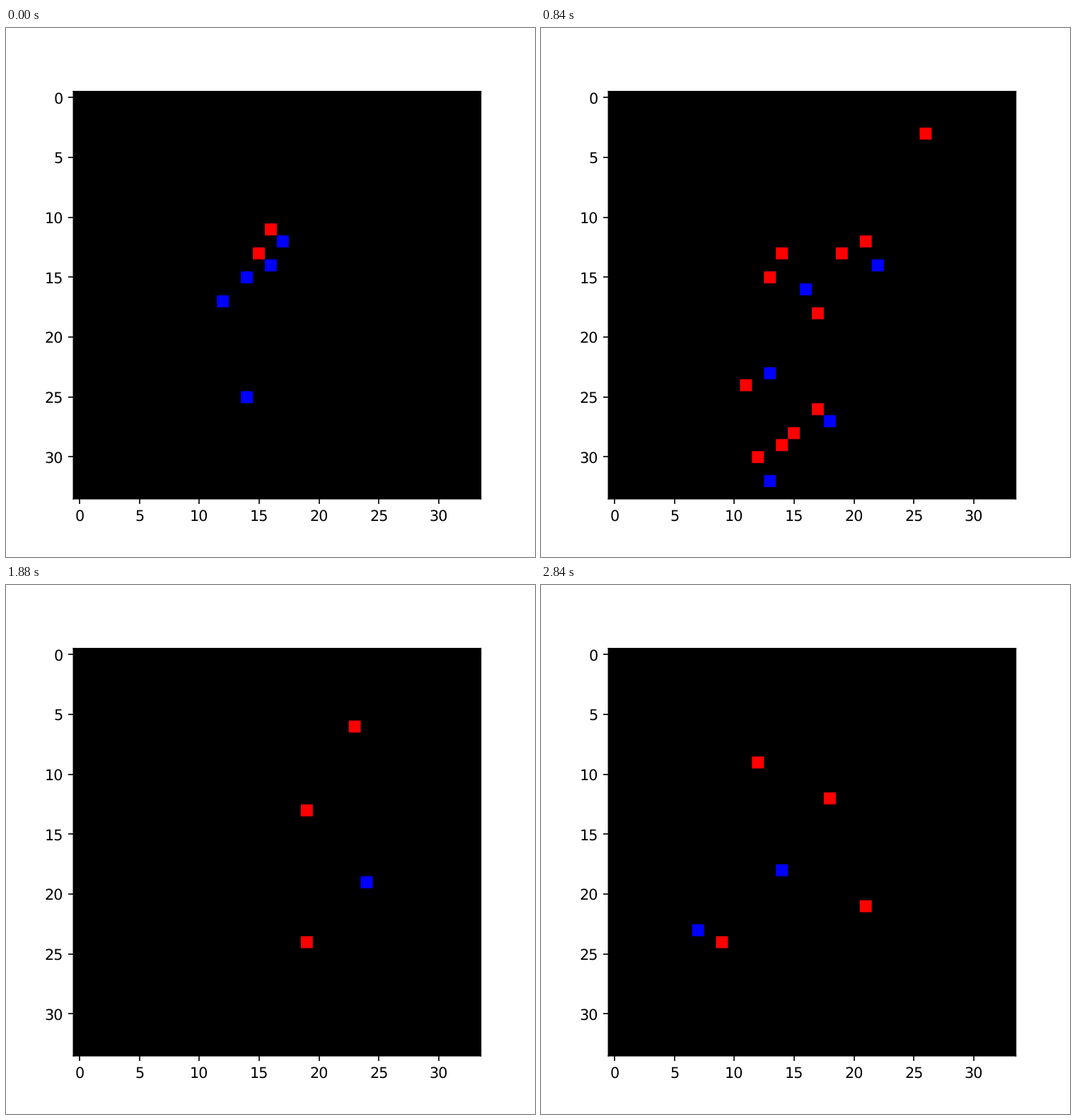
A matplotlib script that plays this animation: 748 px wide and 748 px high, repeating every 2880 ms.

```python
import numpy as np
import matplotlib.pyplot as plt
from matplotlib.animation import FuncAnimation

N = 34          # sensor cells per side
LEG = 24        # frames per sweep
FRAMES = 3 * LEG
SCALE = 32      # fine cells, so that cell edges fall between pixels
RED, BLUE = (255, 0, 0), (0, 0, 255)

# Closed centre line of a slanted 8
EIGHT = np.array([
    (18, 15), (15.3, 11.3), (18, 9.3), (24, 8.3), (20.3, 12.8), (15.5, 17),
    (12.4, 23), (13.5, 25.6), (17, 25.2), (19.2, 23), (20.2, 20), (19.5, 17),
    (18, 15),
])
WIDTH = 1.3
# Corners of the triangle the sensor sweeps along
CORNERS = np.array([(-5, 0.6), (-2.3, 5.1), (3.4, -0.4)])

knots = np.arange(len(EIGHT))
steps = np.linspace(0, knots[-1], 240)
LINE = np.column_stack([np.interp(steps, knots, c) for c in EIGHT.T])
ys, xs = np.mgrid[:N, :N]


def ease(t):
    return t * t * (3 - 2 * t)


def glow(pos):
    """Brightness of the digit on every cell when moved by pos."""
    x, y = (LINE + pos).T
    d2 = ((xs[..., None] - x) ** 2 + (ys[..., None] - y) ** 2).min(axis=2)
    return np.exp(-d2 / WIDTH ** 2)


def render(i):
    rng = np.random.default_rng(100 + i)
    leg, u = divmod(i, LEG)
    start, end = CORNERS[leg], CORNERS[(leg + 1) % 3]
    pos = start + (end - start) * ease(u / LEG)
    half = (end - start) / np.hypot(*(end - start)) / 2

    # Cells fire where the moving digit changes their brightness
    change = glow(pos + half) - glow(pos - half)
    level = 0.3 * rng.lognormal(0, 0.2, (N, N))
    activity = 0.04 + 0.96 * np.exp(-((u - 12) / 7.5) ** 4)
    fires = rng.random((N, N)) < activity

    img = np.zeros((N, N, 3), np.uint8)
    img[fires & (change > level)] = BLUE
    img[fires & (change < -level)] = RED
    x, y = rng.integers(0, N, (2, rng.poisson(1.6)))
    img[y, x] = RED
    return img.repeat(SCALE, axis=0).repeat(SCALE, axis=1)


plt.rcParams["text.hinting"] = "none"
fig, ax = plt.subplots(figsize=(5, 5), dpi=149.6)
picture = ax.imshow(render(0), interpolation="hanning",
                    extent=(-0.5, N - 0.5, N - 0.5, -0.5))
for spine in ax.spines.values():
    spine.set_snap(False)


def update(i):
    picture.set_data(render(i))
    return [picture]


anim = FuncAnimation(fig, update, frames=FRAMES, interval=40, repeat=True)
plt.show()
```
